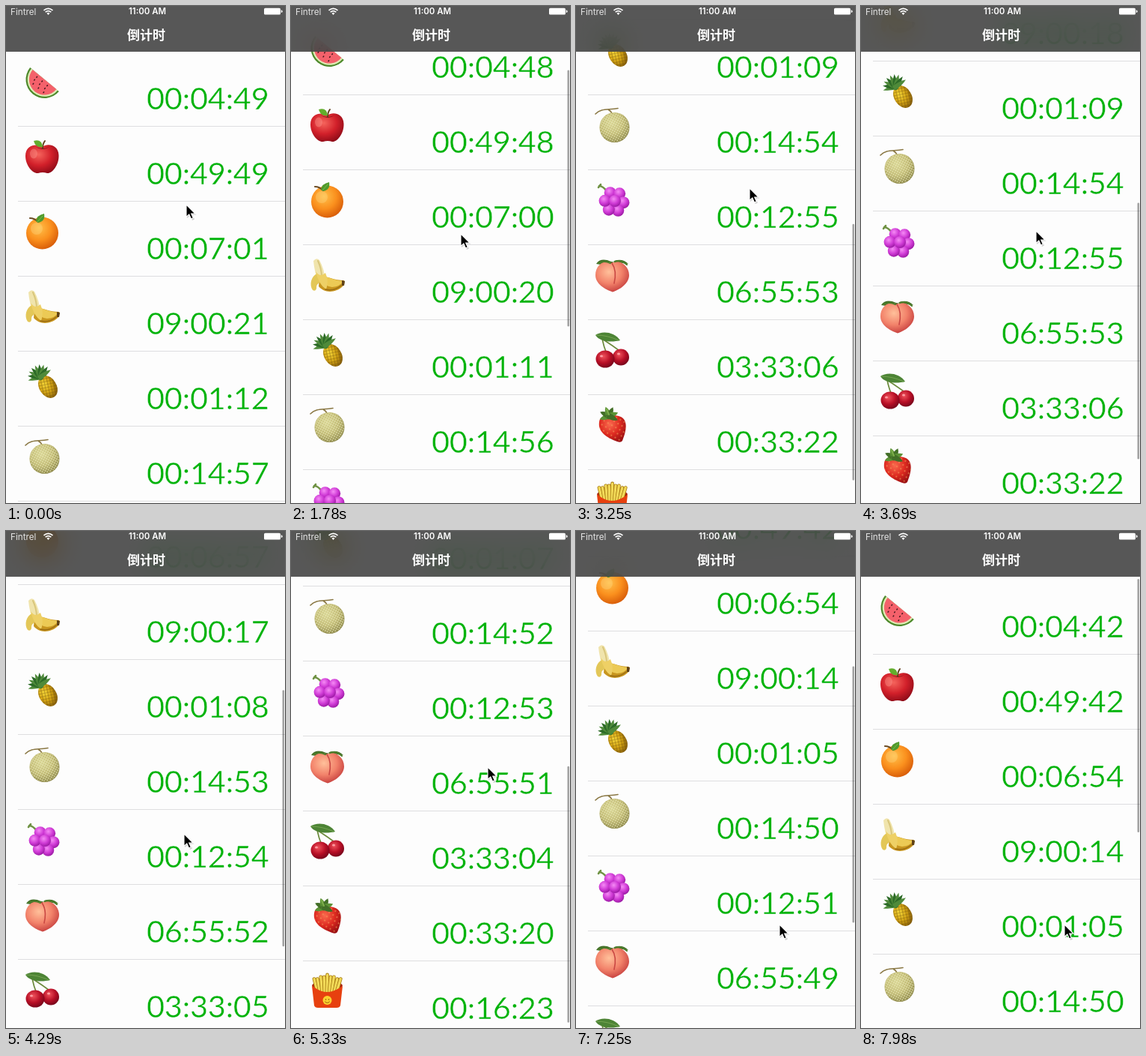
Animation, 373 px wide and 663 px high, one loop 8 s. Source, as an HTML page:

```html
<!DOCTYPE html>
<html lang="zh">
<head>
<meta charset="utf-8">
<title>倒计时</title>
<style>
html, body { margin: 0; width: 100%; height: 100%; overflow: hidden; background: #fdfdfd; }
svg { position: absolute; left: 0; top: 0; display: block; }
#nav {
  position: absolute; left: 0; top: 0; width: 373px; height: 61px;
  background: rgba(62, 62, 62, .865);
  -webkit-backdrop-filter: blur(18px) saturate(1.8);
  backdrop-filter: blur(18px) saturate(1.8);
}
.time { font: 400 41.5px Lato, sans-serif; letter-spacing: -.2px; fill: #00b30a; stroke: #fdfdfd; stroke-width: .5px; }
.title { font: 600 17px "Noto Sans CJK SC", "Noto Sans CJK", sans-serif; }
.status { font: 400 11.7px Inter, sans-serif; }
.clock { font: 600 11.4px Inter, sans-serif; }
</style>
</head>
<body>
<svg id="stage" width="373" height="663" viewBox="0 0 373 663">
  <defs id="defs"></defs>
  <g id="list"></g>
  <rect id="bar" x="369.5" width="2.6" rx="1.3" fill="#000" fill-opacity=".36"/>
  <g id="cursor">
    <path d="M1 1.500V18L5 14.500L8 21L11 19.500L8.300 13.500H13.500Z" opacity=".18"/>
    <path d="M0 0V16.500L3.800 13L6.500 19L9.300 17.800L6.700 12H12Z" stroke="#fff" stroke-width="1.100"/>
  </g>
</svg>
<div id="nav">
  <svg width="373" height="61" viewBox="0 0 373 61" fill="#fff">
    <text class="status" x="6" y="11.500" fill="#e4e4e4">Fintrel</text>
    <path d="M50.500 5.800Q56.500 .8 62.500 5.800M52.700 8.200Q56.500 5 60.300 8.200" fill="none" stroke="#fff" stroke-width="1.700"/>
    <path d="M54.500 9.700Q56.500 8 58.500 9.700L56.500 12Z"/>
    <text class="clock" x="189" y="11.300" text-anchor="middle">11:00 AM</text>
    <rect x="345" y="2.800" width="22" height="8.800" rx="1.600"/>
    <path d="M367.800 5.300Q369.600 5.500 369.600 7.200T367.800 9.100Z"/>
    <text class="title" x="187.500" y="45" text-anchor="middle">倒计时</text>
  </svg>
</div>
<script>
const $ = id => document.getElementById(id);
const LOOP = 8000, STEP = 147.6, MAX = 497, ROW = 100;

const shade = (id, light, mid, dark) => `<radialGradient id="${id}" cx=".4" cy=".34" r=".7">
  <stop stop-color="${light}"/><stop offset=".55" stop-color="${mid}"/><stop offset="1" stop-color="${dark}"/></radialGradient>`;
const weave = (id, size, angle, body) => `<pattern id="${id}" width="${size}" height="${size}"
  patternUnits="userSpaceOnUse" patternTransform="rotate(${angle})">${body}</pattern>`;
$('defs').innerHTML = shade('red', '#f5645c', '#d2202a', '#8f0b18')
  + shade('orange', '#ffc04a', '#fa8f1d', '#d65a08')
  + shade('gold', '#f6d83a', '#d2a213', '#80590a')
  + shade('melon', '#d6d38f', '#bdb66d', '#7f7a3a')
  + shade('grape', '#f58af5', '#d03bd6', '#96179f')
  + shade('peach', '#ffc09a', '#f2826a', '#c43c3c')
  + shade('cherry', '#f0525c', '#b80f26', '#72041a')
  + shade('berry', '#fa6a4e', '#dd2a20', '#9c1013')
  + weave('net', 3, 28, '<path d="M0 0H3M0 0V3" stroke="#f0edc0" stroke-width="1"/>')
  + weave('scales', 4, 20, '<path d="M0 0H4M0 0V4" stroke="#6d4c08" stroke-width="1.200" opacity=".7"/>')
  + weave('pips', 6, 30, '<ellipse cx="3" cy="3" rx=".7" ry="1" fill="#f5a25a"/>');

const path = (d, fill) => `<path d="${d}" fill="${fill}"/>`;
const line = (d, color, w = 1.5) => `<path d="${d}" fill="none" stroke="${color}" stroke-width="${w}" stroke-linecap="round"/>`;
const disc = (x, y, r, fill, ry = r) => `<ellipse cx="${x}" cy="${y}" rx="${r}" ry="${ry}" fill="${fill}"/>`;
const turn = (a, x, y, body) => `<g transform="translate(${x} ${y}) rotate(${a})">${body}</g>`;
const half = (r, fill) => path(`M${-r} 0A${r} ${r} 0 0 0 ${r} 0Z`, fill);
const repeat = (n, draw) => Array.from({ length: n }, (_, i) => draw(i)).join('');

// Each picture is drawn in a 48 x 48 box.
const fruit = {
  watermelon: () => turn(39.5, 27.5, 21,
    half(25, '#4d8a2b') + half(22.8, '#dfeab5') + half(20.6, '#f4616b') +
    repeat(9, i => disc((i % 3 - 1) * 9 + (i > 5 ? 1 : -1), 4 + 5 * Math.floor(i / 3), .8, '#43151c', 1.3))),

  apple: () =>
    path('M25 11C30 6 46 7 46.500 22C47 36 37 47 31 46Q25 44 19 46C12 47 2 36 2 23C2 8 18 6 25 11Z', 'url(#red)') +
    disc(13, 20, 5, '#ff9c9266', 6.500) +
    path('M16 11Q25 15 34 11Q25 17 16 11Z', '#7d0b15') +
    line('M25 13Q25 7 28 3', '#63401f', 2) +
    path('M13 3Q24 0 25 11Q16 13 13 3Z', '#62ad2c'),

  orange: () =>
    disc(24.500, 26, 21.500, 'url(#orange)') +
    disc(17, 20, 8, '#ffdc8a55') +
    line('M8 6Q14 6 19 11', '#6b4c25', 2.200) +
    path('M16 10Q17 2 27 0Q29 10 19 12Z', '#4f9a2c') +
    line('M18 11L25 3', '#86c653', .8),

  banana: () =>
    path('M14 28C20 22 30 31 47 31Q49 36 44 40C36 47 21 49 13 39Z', '#c8961f') +
    path('M15 27C23 23 30 31 46 32Q42 39 31 40Q20 39 15 27Z', '#ecca55') +
    path('M6 5Q10 0 14 4Q21 17 21 29L11 30Q7 16 6 5Z', '#f0e4ac') +
    line('M12 5Q17 16 17 26', '#d9c67c', 2) +
    path('M11 22C3 25 0 37 5 44Q9 46 10 42Q9 36 17 32Z', '#e3c758') +
    path('M9 19Q15 28 22 21Q27 32 23 43Q13 37 9 19Z', '#eed065') +
    line('M22 43Q33 46 43 38', '#9a6c14', 1.600) +
    path('M44 31L48 32L47 38L44 38Z', '#5e4116'),

  pineapple: () => {
    const body = fill => disc(0, 0, 11.500, fill, 16);
    const leaf = i => turn(-105 + 20 * i, 22, 18,
      path('M-3 3Q-4 -8 0 -17Q4 -8 3 3Z', i % 2 ? '#2c6a27' : '#4f8a3a'));
    return turn(-32, 32, 31, body('url(#gold)') + body('url(#scales)')) + repeat(9, leaf);
  },

  melon: () =>
    line('M2 9C10 1 18 4 32 1.500M20 4Q23 5 24 9', '#8a7844', 1.700) +
    disc(27.500, 27, 20, 'url(#melon)') + disc(27.500, 27, 19.500, 'url(#net)'),

  grapes: () => {
    const ring = i => {
      const a = (i * 60 - 115) * Math.PI / 180;
      return disc(27 + 12.5 * Math.cos(a), 26 + 13 * Math.sin(a), 8, 'url(#grape)');
    };
    return line('M7 5Q12 5 18 13M6 7L9 3', '#6f9243', 2.600) + repeat(6, ring) + disc(28, 25, 8, 'url(#grape)');
  },

  peach: () =>
    path('M3 9Q9 0 23 6L46 9Q38 1 27 5L22 12Z', '#3f6d26') +
    path('M24 8C33 2 47 11 47 24C47 36 33 44 25 46.500C15 43 2 36 2 24C2 10 15 2 24 8Z', 'url(#peach)') +
    line('M24 8Q31 18 27 35', '#c94743', 1.600) +
    line('M6 8Q14 4 22 8M28 6Q36 3 44 10', '#4d7c2c', 2.200),

  cherries: () =>
    line('M11 9Q13 19 17 29M11 9Q25 18 37 27', '#6c8a3c', 1.700) +
    path('M2 4C10 -2 27 -1 35 11C24 14 7 13 2 4Z', '#4d8435') +
    line('M3 4Q18 4 33 11', '#80ae5a', .8) +
    disc(36, 33.500, 11, 'url(#cherry)') + disc(15, 36, 12.500, 'url(#cherry)', 11.500) +
    disc(10, 32, 2, '#ff9ba1', 1.500) + disc(33, 29, 2, '#ff9ba1', 1.500),

  strawberry: () => {
    const body = 'M7 20C8 9 24 10 33 12C45 15 45 28 38 45Q36 48 31 46C17 41 5 33 7 20Z';
    const leaf = i => turn(-110 + i * 45, 20, 12, path('M-4 2Q-4 -8 0 -13Q4 -8 4 2Z', i % 2 ? '#426f27' : '#5c9336'));
    return path(body, 'url(#berry)') + path(body, 'url(#pips)') + repeat(6, leaf) + line('M17 3L20 10', '#7eae4c', 2);
  },

  fries: () => {
    const stick = i => {
      const d = `M${7 + i * 4.4} ${2 + Math.abs(i - 4) * 1.4 + i % 2 * 1.5}L${12 + i * 3} 28`;
      return line(d, '#a87c14', 4.800) + line(d, '#f2da58', 3.200);
    };
    return path('M4 16Q24 -9 45 16L38 30H10Z', '#a8220b') + repeat(9, stick) +
      path('M4 17Q6 17 9 20Q24 30 40 20L45 17L42 43Q41 46 37 46H12Q8 46 7 43Z', '#e7400f') +
      disc(24.500, 36, 6, '#fbd02d') + disc(22.500, 35, .8, '#8a4b0c') + disc(26.500, 35, .8, '#8a4b0c') +
      line('M21.500 38Q24.500 41 27.500 38', '#8a4b0c', .9);
  }
};

const starts = `00:04:49 00:49:49 00:07:01 09:00:21 00:01:12 00:14:57
  00:12:58 06:55:56 03:33:09 00:33:25 00:16:28`.split(/\s+/)
  .map(s => s.split(':').reduce((sum, part) => sum * 60 + +part, 0));
const clock = n => [n / 3600, n / 60 % 60, n % 60].map(v => String(Math.floor(v)).padStart(2, '0')).join(':');

$('list').innerHTML = Object.values(fruit).map((draw, i) => `<g transform="translate(0 ${60 + ROW * i})">
  <g transform="translate(24 17)">${draw()}</g>
  <text class="time" x="188" y="78"></text>
  <rect x="16" y="${ROW}" width="357" height="1" fill="#dedee0"/></g>`).join('');
const times = [...document.querySelectorAll('.time')];

const smooth = f => f * f * (3 - 2 * f);
const quicken = f => f * f;
const flick = f => f ** 3;
const settle = f => 1 - (1 - f) ** 2;
const glide = f => (1 - Math.exp(-2.8 * f)) / (1 - Math.exp(-2.8));

// Gestures: start, end, scroll offset and pointer at the end, easing
const moves = [
  [440, 1190, 0, 226, 346, smooth],
  [1490, 1880, 103, 229, 243, flick],
  [1880, 3260, 442, 232, 243, glide],
  [3300, 4289, 289, 238, 404, smooth],
  [4289, 4590, 479, 250, 214, smooth],
  [4750, 5030, 479, 262, 330, smooth],
  [5190, 5780, 540, 266, 214, smooth],
  [5780, 6380, MAX, 266, 214, settle],
  [6650, 6800, MAX, 266, 245, smooth],
  [6800, 7241, 227, 272, 525, quicken],
  [7241, 7690, -22, 272, 525, settle],
  [7690, 8190, 0, 272, 525, settle]
];

function pose(t) {
  let now = [0, 241, 265];
  for (const [from, to, scroll, x, y, ease] of moves) {
    if (t <= from) break;
    const f = ease(Math.min(1, (t - from) / (to - from)));
    now = [scroll, x, y].map((v, i) => now[i] + (v - now[i]) * f);
  }
  return now.map(Math.round);
}

const shown = [[1600, 4960], [5300, 6500], [6750, 9000]];
function barAlpha(t) {
  const span = shown.find(([a, b]) => t > a && t < b);
  return span ? Math.min(1, (span[1] - t) / 150) : 0;
}

function render(ms) {
  const n = Math.max(0, Math.floor((ms - 1) / STEP));
  const t = n ? n * STEP + 9 : 0;
  const [scroll, x, y] = pose(t);
  const tick = Math.max(0, Math.floor((t - 185) / 1000));
  times.forEach((el, i) => { el.textContent = clock(starts[i] - tick); });
  $('list').setAttribute('transform', `translate(0 ${-scroll})`);
  $('cursor').setAttribute('transform', `translate(${x} ${y})`);

  const size = 342 - Math.max(0, -scroll, scroll - MAX);
  const top = scroll > MAX ? 661 - size : 64 + Math.max(0, scroll) * 255 / MAX;
  $('bar').setAttribute('y', top);
  $('bar').setAttribute('height', size);
  $('bar').setAttribute('opacity', barAlpha(t));
}

const began = performance.now();
function loop() {
  render((performance.now() - began) % LOOP);
  requestAnimationFrame(loop);
}
loop();
</script>
</body>
</html>
```
